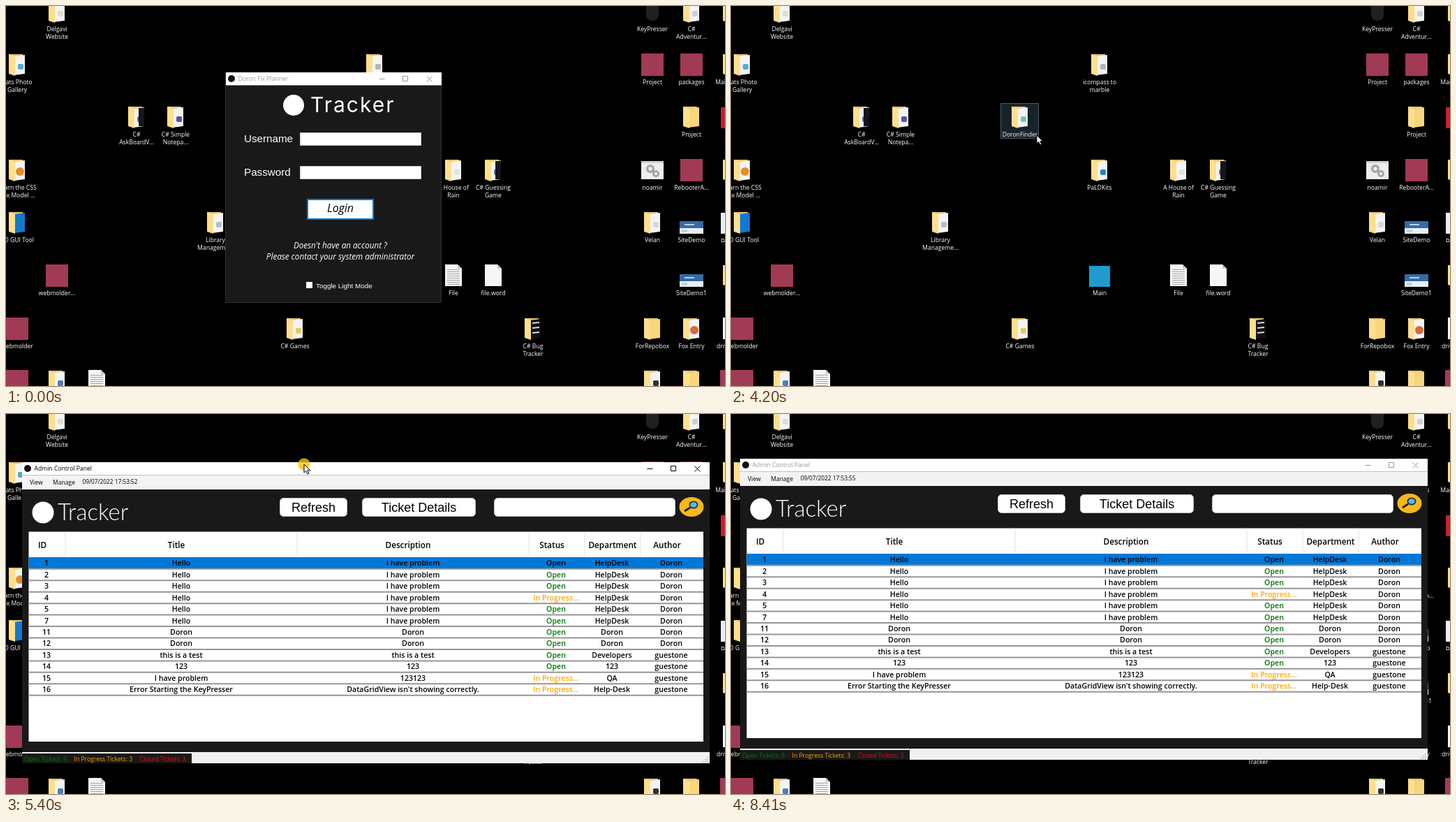
Animation of 1030x544 px, one loop 8.46 s. Source, as an HTML page with a canvas:

```html
<!DOCTYPE html>
<html lang="en">
<head>
<meta charset="utf-8">
<style>
html, body { margin: 0; height: 100%; overflow: hidden; background: #000; }
canvas { display: block; }
</style>
</head>
<body>
<canvas id="stage" width="1030" height="544"></canvas>
<script>
const c = document.getElementById('stage').getContext('2d');
const LOOP = 8460;
const UI = '"Open Sans", "Noto Sans", sans-serif';
const ARIAL = '"Liberation Sans", Arial, sans-serif';
const DARK = '#191919', BLUE = '#0078d7', ORANGE = '#ffa500';

function rect(x, y, w, h, fill, stroke, r = 0) {
  c.beginPath();
  c.roundRect(x, y, w, h, r);
  if (fill) { c.fillStyle = fill; c.fill(); }
  if (stroke) { c.strokeStyle = stroke; c.lineWidth = 1; c.stroke(); }
}
function disc(x, y, rx, fill, ry = rx) {
  c.beginPath();
  c.ellipse(x, y, rx, ry, 0, 0, 7);
  c.fillStyle = fill;
  c.fill();
}
function poly(points, fill, stroke) {
  c.beginPath();
  points.forEach(([x, y]) => c.lineTo(x, y));
  c.closePath();
  c.fillStyle = fill;
  c.fill();
  if (stroke) { c.strokeStyle = stroke; c.lineWidth = 1; c.stroke(); }
}
function line(x1, y1, x2, y2, color, width = 1) {
  c.beginPath();
  c.moveTo(x1, y1);
  c.lineTo(x2, y2);
  c.strokeStyle = color;
  c.lineWidth = width;
  c.stroke();
}
function text(s, x, y, font, color, align = 'left') {
  c.font = font;
  c.fillStyle = color;
  c.textAlign = align;
  c.textBaseline = 'alphabetic';
  c.fillText(s, x, y + parseFloat(font.match(/[\d.]+px/)[0]) * 0.36);
}
const small = (s, x, y, color, align) => text(s, x, y, '8.6px ' + UI, color, align);

// ---------- desktop ----------
function folder(x, y, mark, paper = '#f4f4f4') {
  poly([[x - 12, y - 15], [x + 8, y - 15], [x + 8, y + 13], [x - 12, y + 13]], '#e9c56b');
  poly([[x - 4, y - 12], [x + 11, y - 14], [x + 11, y + 13], [x - 4, y + 15]], paper);
  if (mark) rect(x + 1, y - 1, 8, 8, mark, null, 2);
  poly([[x - 12, y - 15], [x - 3, y - 12], [x - 3, y + 16], [x - 12, y + 13]], '#ffdf8c');
}
function page(x, y, lined) {
  poly([[x - 12, y - 16], [x + 6, y - 16], [x + 12, y - 10], [x + 12, y + 15], [x - 12, y + 15]], '#f6f6f6');
  poly([[x + 6, y - 16], [x + 12, y - 10], [x + 6, y - 10]], '#c9c9c9');
  if (lined) for (let i = -8.5; i < 13; i += 3) line(x - 9, y + i, x + 9, y + i, '#a0a0a0');
}
const icons = {
  folder,
  plain: (x, y) => folder(x, y, null, '#f7d67c'),
  blue: (x, y) => folder(x, y, null, '#1179cf'),
  badge(x, y, color) {
    folder(x, y);
    disc(x + 4, y + 2, 6, color);
  },
  dark(x, y, mark) {
    folder(x, y, mark);
    rect(x + 3, y - 13, 8, 26, '#15151c');
  },
  code(x, y) {
    folder(x, y, null, '#101014');
    for (let i = -8; i < 13; i += 7) line(x - 1, y + i, x + 9, y + i - 1, '#d8d8d8', 2);
  },
  archive: (x, y) => rect(x - 16, y - 16, 32, 32, '#a13a55'),
  text: (x, y) => page(x, y, true),
  blank: (x, y) => page(x, y, false),
  square: (x, y, color) => rect(x - 15, y - 14, 30, 30, color),
  mouse: (x, y) => rect(x - 9, y - 17, 18, 30, '#202020', null, 8),
  script(x, y) {
    rect(x - 16, y - 13, 32, 26, '#eeeeee');
    rect(x - 16, y - 13, 32, 3, '#cfd3d6');
    for (const [dx, dy, r] of [[-3, -2, 6], [5, 5, 5]]) {
      disc(x + dx, y + dy, r, '#a2a6a8');
      disc(x + dx, y + dy, r / 2.2, '#eeeeee');
    }
  },
  site(x, y) {
    rect(x - 17, y - 2, 34, 18, '#e9eff4');
    rect(x - 17, y - 2, 34, 10, '#356aa5');
    rect(x - 10, y + 2, 14, 2, '#b8d1ea');
    rect(x - 14, y + 10, 8, 4, '#c3d2dd');
  }
};
// column, row, icon, label, colour
const items = [
  [0, 1, 'folder', 'Cats Photo|Gallery', '#58a8cf'],
  [0, 3, 'badge', 'Learn the CSS|Box Model ...', '#e0902c'],
  [0, 4, 'blue', 'AD GUI Tool'],
  [0, 6, 'archive', 'webmolder'], [0, 7, 'archive', ''],
  [1, 0, 'folder', 'Delgavi|Website', '#e2dccb'],
  [1, 5, 'archive', 'webmolder...'],
  [1, 7, 'folder', '', '#4a7fc1'], [2, 7, 'text', ''],
  [3, 2, 'dark', 'C#|AskBoardV...', '#6a6f9a'],
  [4, 2, 'folder', 'C# Simple|Notepa...', '#5a50a8'],
  [5, 4, 'folder', 'Library|Manageme...', '#aabfd2'],
  [7, 2, 'folder', 'DoronFinder', '#7fc0ba'],
  [7, 6, 'folder', 'C# Games', '#e8ca55'],
  [9, 1, 'folder', 'icompass to|marble', '#b5b5b5'],
  [9, 3, 'folder', 'PaLDKits', '#2487bd'],
  [9, 5, 'square', 'Main', '#1f9bcf'],
  [11, 3, 'folder', 'A House of|Rain', '#e2e2e2'],
  [12, 3, 'dark', 'C# Guessing|Game', '#5c8296'],
  [11, 5, 'text', 'File'], [12, 5, 'blank', 'file.word'],
  [13, 6, 'code', 'C# Bug|Tracker'],
  [16, 0, 'mouse', 'KeyPresser'],
  [16, 1, 'archive', 'Project'],
  [17, 0, 'folder', 'C#|Adventur...', '#d0d0d0'],
  [17, 1, 'archive', 'packages'],
  [17, 2, 'plain', 'Project'],
  [16, 3, 'script', 'noamir'],
  [17, 3, 'archive', 'RebooterA...'],
  [16, 4, 'folder', 'Velan', '#d5d9df'],
  [17, 4, 'site', 'SiteDemo'], [17, 5, 'site', 'SiteDemo1'],
  [16, 6, 'plain', 'ForRepobox'],
  [17, 6, 'badge', 'Fox Entry', '#d9663c'],
  [16, 7, 'folder', '', '#35302c'], [17, 7, 'plain', ''],
  [18, 0, 'plain', ''], [18, 1, 'plain', 'MainFrame'],
  [18, 2, 'square', '', '#c8202c'], [18, 3, 'plain', ''],
  [18, 4, 'square', 'מסמכים', '#e8eef4'],
  [18, 5, 'plain', ''], [18, 6, 'text', 'drivers.log'], [18, 7, 'archive', '']
];
function desktop(hover) {
  rect(0, 0, 1030, 544, '#000');
  if (hover) rect(386.5, 139.5, 54, 50, '#17232a', '#4b5a63');
  for (const [col, row, kind, label, color] of items) {
    const x = Math.round(16 + 56.85 * col), y = Math.round(33 + 75.6 * row);
    icons[kind](x, y - 25, color);
    label.split('|').forEach((s, i) => small(s, x, y + 11 * i, '#fff', 'center'));
  }
}

// ---------- windows ----------
function titleBar(x, y, w, title, active) {
  const ink = active ? '#000' : '#999';
  rect(x, y, w, 18.5, '#fff');
  disc(x + 8, y + 9, 5, '#111');
  small(title, x + 17.5, y + 9, ink);
  const bx = x + w - 17.5, by = y + 9.5;
  line(bx - 72, by, bx - 64, by, ink);
  rect(bx - 38, by - 4, 7, 7, null, ink);
  line(bx - 4, by - 4, bx + 4, by + 4, ink);
  line(bx - 4, by + 4, bx + 4, by - 4, ink);
}

function field(y, value, focused) {
  rect(421.5, y + 0.5, 173, 18, '#fff', focused ? BLUE : '#c8c8c8');
  text(value, 424, y + 10, '12px ' + ARIAL, '#000');
  if (focused) {
    const x = Math.round(424 + c.measureText(value).width) + 0.5;
    line(x, y + 3, x, y + 16, '#000');
  }
}
const USER = 'frontdesk';
// time, letters shown
const typing = [[1060, 1], [1150, 2], [1250, 3], [1450, 2], [1630, 0], [1820, 1], [1930, 2],
  [2040, 3], [2150, 4], [2250, 6], [2560, 4], [2700, 5], [2760, 6], [2820, 8], [3010, 9]];

function login(t) {
  const active = t >= 610, inPass = t >= 3110;
  const typed = typing.reduce((n, [at, len]) => t >= at ? len : n, 0);
  const stars = t < 3390 ? 0 : Math.min(6, 1 + Math.floor((t - 3390) / 102));
  rect(314.5, 95.5, 309, 329, DARK, '#303030');
  titleBar(315, 95, 309, 'Doron Fix Planner', active);
  disc(412, 142, 15, '#fff');
  c.letterSpacing = '2px';
  text('Tracker', 436, 141, '30px Inter, sans-serif', '#fff');
  c.letterSpacing = '0px';
  text('Username', 341, 189.5, '15.2px ' + ARIAL, '#fff');
  text('Password', 341, 237.5, '15.2px ' + ARIAL, '#fff');
  field(181, USER.slice(0, typed), active && !inPass);
  field(229, '*'.repeat(stars), inPass);
  rect(431, 276, 96, 30, BLUE);
  rect(433, 278, 92, 26, '#fff');
  text('Login', 479, 289.5, 'italic 16px ' + UI, '#000', 'center');
  const note = 'italic 11.7px ' + UI;
  text("Doesn't have an account ?", 479, 343, note, '#fff', 'center');
  text('Please contact your system administrator', 479, 359, note, '#fff', 'center');
  rect(430, 395, 9, 9, '#fff');
  text('Toggle Light Mode', 444, 400, '9.9px ' + ARIAL, '#fff');
}

const heads = [['ID', 29, 35], ['Title', 221, 228], ['Description', 553, 560],
  ['Status', 759, 765], ['Department', 846, 845], ['Author', 924, 930]];
const edges = [9.5, 62, 394, 726, 806, 886, 976];
const problem = n => [n, 'Hello', 'I have problem', 'Open', 'HelpDesk', 'Doron'];
const own = n => [n, 'Doron', 'Doron', 'Open', 'Doron', 'Doron'];
const rows = [
  ...[1, 2, 3, 4, 5, 7].map(problem), own(11), own(12),
  [13, 'this is a test', 'this is a test', 'Open', 'Developers', 'guestone'],
  [14, '123', '123', 'Open', '123', 'guestone'],
  [15, 'I have problem', '123123', 'In Progress...', 'QA', 'guestone'],
  [16, 'Error Starting the KeyPresser', "DataGridView isn't showing correctly.", 'In Progress...', 'Help-Desk', 'guestone']
];
rows[3][3] = 'In Progress...';

function button(x, w, label) {
  rect(x + 0.5, 51.5, w - 1, 26, '#fff', '#c4c4c4', 5);
  text(label, x + w / 2, 64.5, '18px ' + ARIAL, '#000', 'center');
}
function table(mouse) {
  rect(9.5, 99.5, 966.5, 300.5, '#fff');
  const inHead = mouse && mouse.y > 99 && mouse.y < 136;
  heads.forEach(([name, x], i) => {
    if (inHead && mouse.x > edges[i] && mouse.x < edges[i + 1])
      rect(edges[i], 99.5, edges[i + 1] - edges[i], 36.5, '#d9ebf9');
    if (i) line(edges[i], 99.5, edges[i], 136, '#e2e2e2');
    text(name, x, 119, '600 11.7px ' + UI, '#000', 'center');
  });
  rect(9.5, 136, 966.5, 16, BLUE);
  rows.forEach((row, r) => {
    const y = 144.5 + 16.45 * r;
    line(9.5, y + 8.3, 976, y + 8.3, '#969696', 2);
    row.forEach((s, i) => {
      const color = i != 3 || !r ? '#000' : s == 'Open' ? '#007000' : ORANGE;
      text(String(s), heads[i][2], y, '600 10.6px ' + UI, color, 'center');
    });
  });
}
function admin(t, x, y, mouse) {
  const second = 51 + [5250, 6040, 6950, 7960].filter(at => t >= at).length;
  c.save();
  c.translate(x, y);
  rect(0, 0, 985, 431, DARK);
  titleBar(0, 0, 985, 'Admin Control Panel', t < 8410);
  rect(0, 18.5, 985, 20.5, '#f3f3f3');
  small('View', 11, 29, '#000');
  small('Manage', 44, 29, '#000');
  text('09/07/2022 17:53:' + second, 86.5, 28.5, '8.3px ' + UI, '#000');
  disc(30, 72, 15.5, '#fff');
  text('Tracker', 51, 71.5, '300 33px Lato, sans-serif', '#fff');
  button(369, 97, 'Refresh');
  button(487, 163, 'Ticket Details');
  button(676, 260, '');
  disc(959, 64, 17.5, '#f8b71d', 14);
  line(949, 70, 957, 65, '#222', 3);
  disc(962, 61, 6.5, '#16335c', 5.5);
  disc(962, 61, 4.7, '#62b5e8', 3.8);
  table(mouse && { x: mouse.x - x, y: mouse.y - y });
  rect(0, 415, 985, 16, '#f0f0f0');
  rect(0, 417, 243, 14, DARK);
  small('Open Tickets: 9', 3, 424.5, '#007800');
  small('In Progress Tickets: 3', 74.5, 424.5, ORANGE);
  small('Closed Tickets: 3', 168.5, 424.5, '#e01010');
  for (let i = 0; i < 3; i++)
    for (let j = 0; j <= i; j++) rect(981 - 3 * j, 422 + 3 * i, 1.5, 1.5, '#a5a5a5');
  c.restore();
}

// ---------- pointer ----------
// start, end, number of jumps, x, y
const moves = [
  [60, 60, 1, 846, 481], [120, 610, 8, 438, 185],
  [4750, 4750, 1, 575, 97], [4800, 5010, 4, 488, 83],
  [5290, 5400, 3, 427, 72], [5480, 5570, 2, 417, 67],
  [6040, 6040, 1, 420, 68], [6100, 6240, 3, 427, 200],
  [6290, 6630, 6, 877, 344], [6810, 7650, 14, 817, 488]
];
function mouseAt(t) {
  let x = 846, y = 481;
  for (const [from, to, n, tx, ty] of moves) {
    if (t < from) break;
    const k = t >= to ? 1 : (Math.floor((t - from) / (to - from) * (n - 1)) + 1) / n;
    x += (tx - x) * k;
    y += (ty - y) * k;
  }
  return { x, y };
}
const within = (t, a, b) => t >= a && t < b;

function pointer(t, { x, y }) {
  if (within(t, 610, 750) || within(t, 5250, 6040)) disc(x, y, 8.7, 'rgba(235,200,20,.8)');
  if (t < 1060 && x > 421 && x < 595 && y > 181 && y < 200) {
    line(x + 0.5, y - 6, x + 0.5, y + 6, '#000');
    line(x - 2, y - 6, x + 3, y - 6, '#000');
    line(x - 2, y + 6, x + 3, y + 6, '#000');
  } else if (t >= 7650) {
    const side = d => [[0, 7], [3.5, 3.5], [1, 3.5], [1, 0], [-1, 0], [-1, 3.5], [-3.5, 3.5]]
      .map(([px, py]) => [x + px, y + py * d]);
    poly(side(1), '#fff', '#000');
    poly(side(-1), '#fff', '#000');
  } else {
    const arrow = [[0, 0], [0, 12], [2.8, 9.5], [4.8, 14], [6.8, 13], [4.9, 8.7], [8.7, 8.7]];
    poly(arrow.map(([px, py]) => [x + px, y + py]), '#fff', '#000');
  }
}

function draw(now) {
  const t = now % LOOP;
  const shown = within(t, 60, 1060) || within(t, 4130, 7700);
  const mouse = mouseAt(t);
  desktop(within(t, 4200, 4250));
  if (t < 4130) login(t);
  if (t >= 4250) {
    const grip = mouseAt(Math.min(Math.max(t, 5250), 6000));
    admin(t, Math.round(grip.x) - 404, Math.round(grip.y) - 3, shown && t >= 4320 && mouse);
  }
  if (shown) pointer(t, mouse);
}
const start = performance.now();
function tick() {
  draw(performance.now() - start);
  requestAnimationFrame(tick);
}
tick();
</script>
</body>
</html>
```
